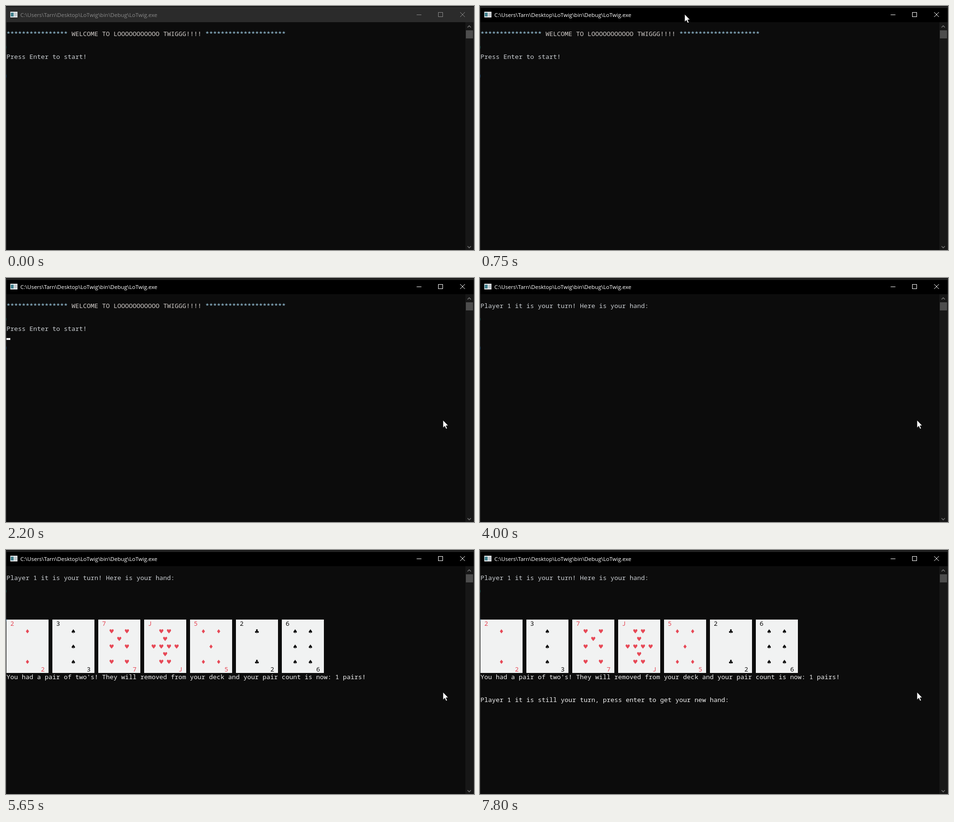
An HTML page with a canvas that plays this animation: 979 by 512 pixels, repeating every 8 s.

```html
<!DOCTYPE html>
<html>
<head>
<meta charset="utf-8">
<style>
html, body { margin: 0; width: 100%; height: 100%; overflow: hidden; background: #0c0c0c; }
canvas { display: block; }
</style>
</head>
<body>
<canvas id="stage" width="979" height="512"></canvas>
<script>
const ctx = document.getElementById('stage').getContext('2d');
const LOOP = 8000, COL = 8, ROW = 16, LEFT = 1, TOP = 34;
const MONO = '13.333px "Noto Sans Mono", "DejaVu Sans Mono", monospace';
const PATH = 'C:\\Users\\Tarn\\Desktop\\LoTwig\\bin\\Debug\\LoTwig.exe';
const RED = '#e74856', BLACK = '#0c0c0c', GREY = '#ccd0d4', WHITE = '#f2f2f2';

// rank, suit, colour, pips as column and row digits
const CARDS = [
  ['2', '♦', RED, '51 55'],
  ['3', '♠', BLACK, '51 53 55'],
  ['7', '♥', RED, '31 71 52 33 73 35 75'],
  ['J', '♥', RED, '41 61 52 23 43 63 83 54 45 65'],
  ['5', '♦', RED, '31 71 53 35 75'],
  ['2', '♣', BLACK, '51 55'],
  ['6', '♠', BLACK, '31 71 33 73 35 75']
];

// caret: from, to, row
const CARETS = [
  [1300, 1750, 5], [2200, 2550, 5], [2550, 2600, 6], [2600, 3050, 3], [3500, 4000, 3],
  [4250, 4800, 16], [5250, 5650, 16], [6550, 7000, 19], [7400, 7800, 19]
];

function rect(x, y, w, h, color) {
  ctx.fillStyle = color;
  ctx.fillRect(x, y, w, h);
}

function line(color, ...pts) {
  ctx.strokeStyle = color;
  ctx.beginPath();
  for (let i = 0; i < pts.length; i += 2) ctx.lineTo(pts[i], pts[i + 1]);
  ctx.stroke();
}

function print(text, col, row, color) {
  ctx.font = MONO;
  ctx.textAlign = 'left';
  ctx.fillStyle = color;
  ctx.fillText(text, LEFT + col * COL, TOP + row * ROW + 13);
}

function drawWindow(active) {
  const ink = active ? '#fff' : '#8a8a8a';
  rect(0, 0, 979, 512, '#0c0c0c');
  rect(0, 0, 979, 3, '#1c1c1c');
  rect(0, 3, 979, 1, active ? '#303030' : '#3a3a3a');
  rect(0, 4, 979, 30, active ? '#000' : '#2b2b2b');
  rect(0, 4, 1, 508, active ? '#242424' : '#303030');
  rect(978, 4, 1, 508, active ? '#242424' : '#303030');
  rect(0, 84, 1, 5, '#1f5650');
  rect(0, 144, 1, 6, '#204a6a');

  rect(9, 12, 15, 12, '#e8ebee');
  rect(10, 14, 6, 8, '#3f7f8c');
  rect(17, 14, 6, 8, '#c3c9cd');

  ctx.font = '11.5px "Open Sans", "Noto Sans", sans-serif';
  ctx.textAlign = 'left';
  ctx.fillStyle = ink;
  ctx.fillText(PATH, 30, 23);

  ctx.lineWidth = 1;
  line(ink, 859, 18.5, 869, 18.5);
  ctx.strokeRect(904.5, 13.5, 9, 9);
  line(ink, 950, 13, 960, 23);
  line(ink, 960, 13, 950, 23);

  rect(961, 34, 17, 478, '#171717');
  rect(962, 51, 15, 17, '#4d4d4d');
  ctx.lineWidth = 1.6;
  line('#717171', 965.5, 45, 969, 41.5, 972.5, 45);
  line('#717171', 965.5, 504, 969, 507.5, 972.5, 504);
}

function drawWelcome() {
  print('*'.repeat(16), 0, 1, '#a6d6ee');
  print('WELCOME TO L' + 'O'.repeat(11) + ' TWIGGG!!!!', 17, 1, '#d2cdca');
  print('*'.repeat(21), 52, 1, '#a6d6ee');
  print('Press Enter to start!', 0, 4, GREY);
}

function drawCard([rank, suit, color, pips], i) {
  const x = LEFT + i * 96, y = TOP + 7 * ROW;
  rect(x, y, 88, 112, '#f1f2f2');
  print(rank, i * 12 + 1, 7, color);
  print(rank, i * 12 + 9, 13, color);
  ctx.font = '12px "DejaVu Sans", sans-serif';
  ctx.textAlign = 'center';
  for (const [col, row] of pips.split(' '))
    ctx.fillText(suit, x + col * COL + 4, y + row * ROW + 12.5);
}

function drawPointer(t) {
  if (t < 200) return;
  const step = Math.floor(t / 50) * 50;
  const part = (from, to) => Math.min(1, Math.max(0, (step - from) / (to - from)));
  const a = part(200, 600), b = part(950, 1750);
  const easeOut = 1 - (1 - a) ** 2, smooth = b * b * (3 - 2 * b);
  const x = 171 + 257 * easeOut + 486 * smooth;
  const y = -10 + 27 * easeOut + 281 * smooth;
  ctx.save();
  ctx.translate(Math.round(x), Math.round(y));
  const arrow = new Path2D('M0 0V16.5L3.8 13L6.5 19L9.2 17.8L6.6 12H11.5Z');
  ctx.lineWidth = 1;
  ctx.strokeStyle = '#000';
  ctx.fillStyle = '#fff';
  ctx.fill(arrow);
  ctx.stroke(arrow);
  ctx.restore();
}

function draw(t) {
  drawWindow(t >= 750);
  if (t < 2550) drawWelcome();
  if (t >= 2600) print('Player 1 it is your turn! Here is your hand:', 0, 1, GREY);
  if (t >= 4250) {
    CARDS.forEach(drawCard);
    print("You had a pair of two's! They will removed from your deck and your pair count is now: 1 pairs!", 0, 14, WHITE);
  }
  if (t >= 5900) print('Player 1 it is still your turn, press enter to get your new hand:', 0, 17, WHITE);
  for (const [from, to, row] of CARETS)
    if (t >= from && t < to) rect(LEFT, TOP + row * ROW + 12, 8, 4, WHITE);
  drawPointer(t);
}

const start = performance.now();
function tick() {
  draw((performance.now() - start) % LOOP);
  requestAnimationFrame(tick);
}
tick();
</script>
</body>
</html>
```
